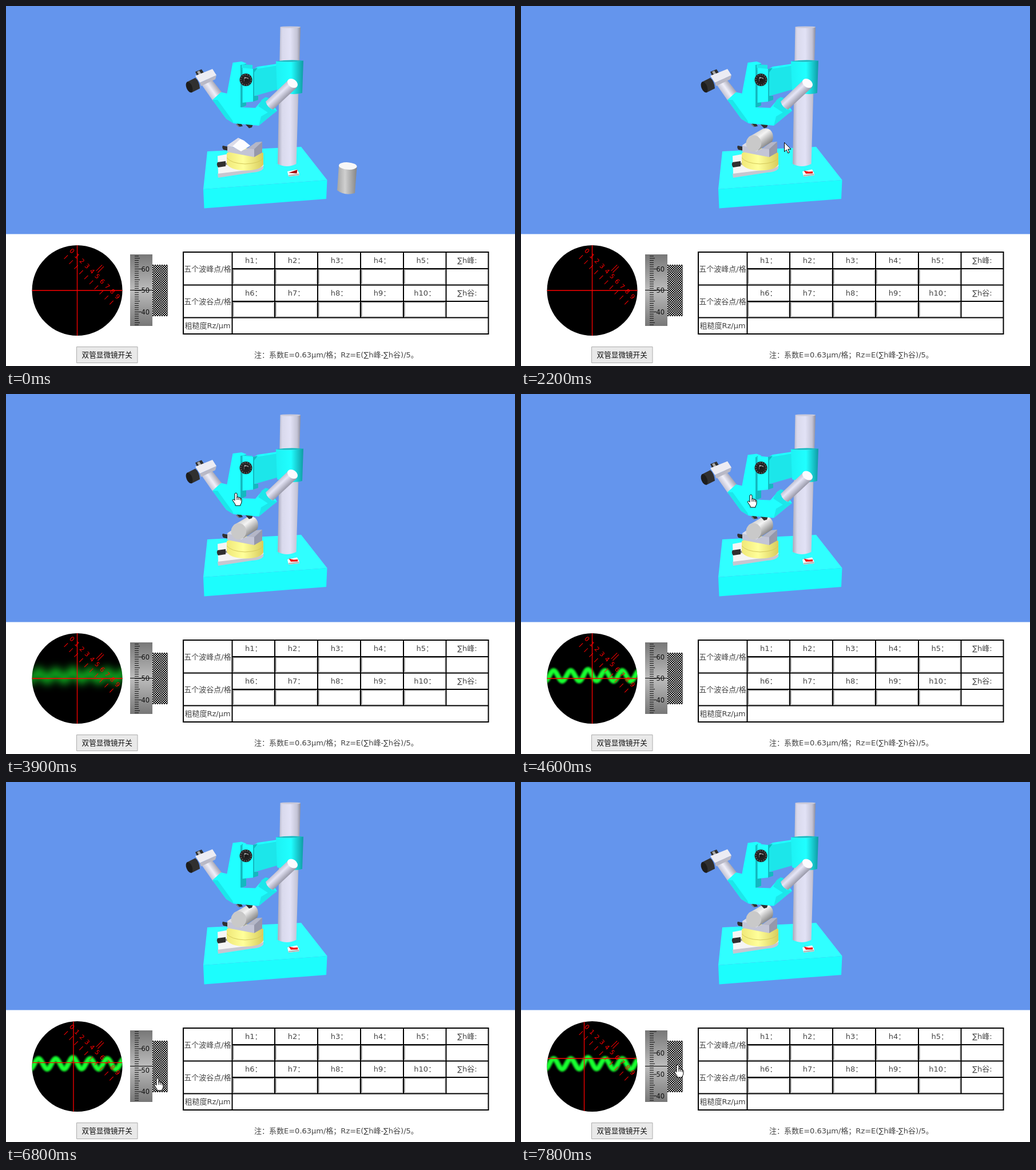
An HTML page that plays this animation: 890 by 629 pixels, repeating every 8000 ms.

```html
<!DOCTYPE html>
<html lang="zh-CN">
<head>
<meta charset="utf-8">
<title>双管显微镜</title>
<style>
html, body { margin: 0; width: 100%; height: 100%; overflow: hidden; background: #fff; }
svg { display: block; width: 890px; height: 629px; font: 13px "DejaVu Sans", "Noto Sans CJK SC", "Noto Sans CJK", sans-serif; }
.mid { text-anchor: middle; }
.cy { fill: #20ffff; }
.cy2 { fill: #1ce6ea; }
.cy3 { fill: #13b9c0; }
.dark { fill: #303030; }
.red { stroke: #f00; fill: none; }
</style>
</head>
<body>
<svg viewBox="0 0 890 629">
  <defs>
    <linearGradient id="steel">
      <stop offset="0" stop-color="#a9a9bb"/><stop offset=".2" stop-color="#d9d9ec"/>
      <stop offset=".55" stop-color="#e2e2f6"/><stop offset=".85" stop-color="#c4c4d6"/><stop offset="1" stop-color="#8d8d9c"/>
    </linearGradient>
    <linearGradient id="tubeL" gradientUnits="userSpaceOnUse" x1="351" y1="150" x2="368" y2="138">
      <stop offset="0" stop-color="#c3c3d3"/><stop offset=".45" stop-color="#f0f0fa"/><stop offset="1" stop-color="#a3a3b3"/>
    </linearGradient>
    <linearGradient id="tubeR" gradientUnits="userSpaceOnUse" x1="473" y1="147" x2="487" y2="162">
      <stop offset="0" stop-color="#b9b9ca"/><stop offset=".4" stop-color="#e6e6f7"/><stop offset="1" stop-color="#9b9bab"/>
    </linearGradient>
    <linearGradient id="collar">
      <stop offset="0" stop-color="#1df2f4"/><stop offset=".55" stop-color="#20ffff"/><stop offset="1" stop-color="#109ba4"/>
    </linearGradient>
    <linearGradient id="part">
      <stop offset="0" stop-color="#a4a4a4"/><stop offset=".4" stop-color="#d0d0d0"/><stop offset="1" stop-color="#858585"/>
    </linearGradient>
    <linearGradient id="lying" gradientUnits="userSpaceOnUse" x1="411" y1="220" x2="430" y2="244">
      <stop offset="0" stop-color="#d2d2d2"/><stop offset=".35" stop-color="#f4f4f4"/><stop offset="1" stop-color="#858585"/>
    </linearGradient>
    <linearGradient id="disc">
      <stop offset="0" stop-color="#f0e878"/><stop offset=".45" stop-color="#ffff9a"/><stop offset="1" stop-color="#d8cc5c"/>
    </linearGradient>
    <linearGradient id="drum" x2="0" y2="1">
      <stop offset="0" stop-color="#777"/><stop offset=".5" stop-color="#bdbdbd"/><stop offset="1" stop-color="#777"/>
    </linearGradient>
    <pattern id="knurl" width="4" height="4" patternUnits="userSpaceOnUse">
      <path fill="#c9c9c9" d="M0 0H4V4H0Z"/><path d="M0 0H2V2H0ZM2 2H4V4H2Z"/>
    </pattern>
    <clipPath id="eye"><circle cx="124.5" cy="497" r="79"/></clipPath>
    <clipPath id="window"><path d="M217 434H256V559H217Z"/></clipPath>
  </defs>

  <path fill="#6495ed" d="M0 0H890V398.5H0Z"/>

  <!-- base and switch -->
  <path fill="#30ffff" d="M352 254L516 246L561.5 304L345 320Z"/>
  <path fill="#1cfdfd" d="M345 320L561.5 304L560 337L346.500 353.500Z"/>
  <path fill="#fff" d="M492 289L509 285.500L512.500 292V296L494 298Z"/>
  <path fill="#bdbdbd" d="M494 295L512.500 292.500V296L494 298Z"/>
  <path id="off" fill="#a81010" d="M494 291.500L509.500 286L508.500 292.500Z"/>
  <path id="on" fill="#f01818" d="M494.500 287.500L503 289.500L510.500 289L510 292.500L498 293Z"/>

  <!-- column, collar, arm -->
  <path fill="url(#steel)" d="M479.500 37H515L507.500 276Q491 284 475 276Z"/>
  <ellipse cx="497.200" cy="37" rx="17.800" ry="1.600" fill="#c9c9da"/>
  <path class="cy2" d="M432 111L474 103V146L432 158Z"/>
  <path class="cy" d="M432 111L440 106L474 101V104Z"/>
  <path fill="url(#collar)" d="M472 96.500Q496 99 520 95.500L518 152Q500 157 474 149Z"/>
  <path class="cy3" d="M472 96.500Q496 93 520 95.500Q496 99 472 96.500Z"/>

  <!-- loose part -->
  <g id="loose">
    <path fill="url(#part)" d="M582 279L579 322Q592 332 610 327L613.500 281Z"/>
    <ellipse cx="597.800" cy="279.500" rx="15.800" ry="6.300" fill="#f7f7f7" transform="rotate(4 598 279)"/>
  </g>

  <!-- stage and block -->
  <path fill="#f5f5f5" d="M370 262L386 259L450 276Q452 284 440 286L371 294Z"/>
  <path fill="#c6c6d0" d="M370 293L428 286Q446 284 450 279V284Q446 290 430 291L371 300Z"/>
  <path class="dark" d="M379 244L389 246V253L380 251Q377 247 379 244Z"/>
  <path class="dark" d="M370 273L384 271V280L371 282Q367 277 370 273Z"/>
  <path fill="#8d8d8d" d="M384 274L389 273V277L384 278Z"/>
  <path fill="url(#disc)" d="M386 257Q418 240 450 257V277Q445 287 418 287.500Q391 286 386 276Z"/>
  <path fill="none" stroke="#d5c95c" d="M386 265Q393 275 418 276Q445 275 450 265"/>
  <path fill="#c3c5d6" d="M387 243L396 246L411 253L425 248L434 249.500V264L387 255Z"/>
  <path fill="#9698aa" d="M434 249.500L448 237V256L434 264Z"/>
  <path fill="#fdfdff" d="M387 243.500L406 230.500L416 235L427 244L411 254L397 246Z"/>
  <path fill="#dcdce8" d="M387 243.500L406 230.500L410 232.300L395 246Z"/>
  <path fill="#b4b6c6" d="M422 249L437 238L448 237L434 250Z"/>
  <g id="placed">
    <path fill="url(#lying)" d="M398 229L423 214.500Q436 212 440 223Q442 232 439 237L415 252Z"/>
    <ellipse cx="406.800" cy="240" rx="13.300" ry="14.300" fill="#c9c9c9"/>
  </g>

  <!-- sliding head, with the fixed bracket in front of it -->
  <g id="head">
    <path class="dark" d="M402 203L411 205L414 210L408 211Z"/>
    <path class="dark" d="M417 205L432 206L430 212L425 213.500Z"/>
    <path fill="#777" d="M404 206L409 211L407 211.500L402 207Z"/>
    <path class="dark" d="M331 115L342 110.500L348 120L336 126Z"/>
    <path fill="#aaa" d="M334 115L338 113L343 121L339 123Z"/>
    <path fill="url(#tubeL)" d="M341 136L357 125L380 154L362 166Z"/>
    <path fill="#ececf3" d="M331 122L361 110L368 121L339 134Z"/>
    <path fill="#b9b9c6" d="M339 134L368 121L366 128L341 140Z"/>
    <path class="dark" d="M316 133L331 125.500Q338 131 339 144L324 151.500Q314 146 316 133Z"/>
    <ellipse cx="320.500" cy="142" rx="5" ry="9.800" fill="#1d1d1d" transform="rotate(-22 320 142)"/>
    <path class="cy" d="M396.500 99L412 97L420 100V174L409 178L386 155Z"/>
    <path class="cy3" d="M410 103L420 101V174L410 178Z"/>
    <path class="cy2" d="M412 102L431 103V112H412Z"/>
    <path class="cy" d="M361 164L376 150.500L387 153L410 177L436 178L450 162L462 165L474 183L465 190L442 209L398 205L385 197Z"/>
    <path class="cy2" d="M361 164L385 197L398 205L396 200L370 164Z"/>
    <path class="cy2" d="M442 209L465 190L474 183L466 181L446 193Z"/>
    <path class="cy2" d="M441 175L447 164L454 159L460 161L455 166L464 181L472 185L464 190Z"/>
    <path fill="url(#tubeR)" d="M454 167L493 130L509 142L467 181Q457 178 454 167Z"/>
    <ellipse cx="501" cy="135" rx="9.800" ry="7" fill="#fbfbff" transform="rotate(36 501 135)"/>
  </g>
  <path class="cy" d="M413 108L432 110V167L413 169Z"/>
  <path class="cy3" d="M432 110L440 108L434 116V157L441 157V164L432 167Z"/>
  <path fill="none" stroke="#12aeb5" d="M413 108V169"/>
  <circle cx="419.500" cy="129" r="11" fill="#232323"/>
  <circle cx="419.500" cy="129" r="9" fill="none" stroke="#666" stroke-width="2" stroke-dasharray="1.500 2.500"/>
  <path fill="#b5b5b5" d="M417 124L424 126L421 133L416 131Z"/>
  <circle cx="420" cy="129.500" r="3.500" fill="#1c1c1c"/>

  <!-- eyepiece view -->
  <circle cx="124.500" cy="497" r="79"/>
  <g clip-path="url(#eye)">
    <g id="wave" fill="none" stroke-linejoin="round">
      <path stroke="#0a8f18" stroke-width="10.500"/>
      <path stroke="#18ff30" stroke-width="6.500"/>
    </g>
    <g id="scale" transform="translate(115.500 428) rotate(45)" fill="#f00" font-size="11" class="mid">
      <path class="red" d="M54.500 -20V-5M58.500 -20V-5"/>
    </g>
    <path id="cross" class="red" stroke-width="1.300" d="M124.500 400V600M30 497H220"/>
  </g>

  <!-- micrometer -->
  <path fill="url(#drum)" d="M217 434H256V559H217Z"/>
  <g clip-path="url(#window)"><g id="ticks" font-size="11.500" fill="#111"></g></g>
  <path stroke="#000" d="M217 496.500H256"/>
  <path fill="url(#knurl)" d="M256 452H283V542H256Z"/>

  <g id="table" fill="#444"></g>
  <path fill="#e9e9e9" stroke="#adadad" d="M123.500 595.500H230V623.500H123.500Z"/>
  <text class="mid" x="176.700" y="614" font-size="12.600" fill="#111">双管显微镜开关</text>
  <text x="434" y="614" fill="#444">注：系数E=0.63μm/格；Rz=E(∑h峰-∑h谷)/5。</text>

  <g id="cursor" fill="#fff" stroke="#000" stroke-linejoin="round">
    <path id="arrow" d="M.5 .5V16.500L4.200 13.200L6.800 19L9.300 18L6.800 12.200H12Z"/>
    <g id="hand">
      <path d="M-2 2Q-2 0 0 0T2 2V8Q2 6.500 3.500 6.700T5 8.300Q5.500 7.500 7 8T8 9.500Q10 9 10 11V15Q10 18 8 20V22H-1V20L-5 14Q-6.500 12 -5 11.200T-2 13Z"/>
      <path fill="none" d="M2 7V12M5 8V12M8 9V13"/>
    </g>
  </g>
</svg>
<script>
const $ = id => document.getElementById(id);

function add(parent, tag, attrs, text) {
  const el = document.createElementNS("http://www.w3.org/2000/svg", tag);
  for (const k in attrs) el.setAttribute(k, attrs[k]);
  if (text !== undefined) el.textContent = text;
  $(parent).append(el);
}

// Profile seen in the eyepiece
let d = "";
for (let x = 36; x <= 214; x++) {
  const y = 492.500 - 9 * Math.cos((x - 57) * Math.PI / 15) - 2 * Math.exp(-(((x - 118) / 12) ** 2));
  d += (d ? "L" : "M") + x + " " + y.toFixed(1);
}
for (const p of $("wave").children) p.setAttribute("d", d);

for (let i = 0; i < 10; i++) {
  const u = i * 12.500;
  add("scale", "text", { x: u, y: 4 }, i);
  add("scale", "path", { class: "red", d: `M${u} 10.500V19.500` });
}

const unitY = n => 497 - (n - 50) * 3.750;
for (let n = 26; n <= 72; n++) {
  const long = n % 10 ? (n % 5 ? 7 : 9) : 12;
  add("ticks", "path", { stroke: "#111", d: `M225 ${unitY(n)}h${long}` });
}
for (const n of [40, 50, 60]) {
  add("ticks", "text", { x: 236.500, y: unitY(n) + 4.200, textLength: "" }, n);
}

// Results table
const cols = [395.500, 470, 545, 620, 695, 769.500, 843.500];
const label = (x, y, s) => add("table", "text", { class: "mid", x, y }, s);
const names = [["h1：", "h2：", "h3：", "h4：", "h5：", "∑h峰:"], ["h6：", "h7：", "h8：", "h9：", "h10：", "∑h谷:"]];
names.forEach((row, r) => {
  const top = 430 + r * 57.300;
  label(352.500, top + 33.500, r ? "五个波谷点/格" : "五个波峰点/格");
  row.forEach((s, c) => {
    label((cols[c] + cols[c + 1]) / 2, top + 19, s);
    if (c > 4) return;
    const x = cols[c] + 2, y = top + 30.500, w = cols[c + 1] - cols[c] - 4, h = 25;
    add("table", "path", { fill: "none", stroke: "#999", "stroke-width": 1.500, d: `M${x} ${y + h}v${-h}h${w}` });
    add("table", "path", { fill: "none", stroke: "#d6d6d6", "stroke-width": 1.500, d: `M${x} ${y + h}h${w}v${-h}` });
  });
});
label(352.500, 563, "粗糙度Rz/μm");
let grid = "M310 430H843.500V573H310ZM395.500 430V573M310 487.500H843.500M310 544.500H843.500M395.500 459H843.500M395.500 516H843.500";
for (const x of cols.slice(1, 6)) grid += `M${x} 430V544.500`;
add("table", "path", { fill: "none", stroke: "#000", "stroke-width": 2, d: grid });

// time, x, y of the pointer tip
const path = [
  [100, 873, 44], [500, 600, 285], [600, 583, 297], [900, 583, 297], [1000, 562, 298], [1200, 502, 292],
  [1300, 504, 287], [1600, 504, 290], [1900, 504, 290], [2600, 402, 168], [5000, 402, 168],
  [5900, 450, 458], [6000, 430, 468], [6200, 288, 517], [6400, 266, 520], [7100, 265, 514], [7800, 274, 494]
];
const hands = [[600, 900], [1300, 1900], [2600, 5000], [6300, 8000]];
// time, head drop, blur of the profile
const focus = [
  [0, 0, 0], [3100, 1.500, 0], [3500, 2.500, 9], [3600, 3.500, 7.500], [3800, 4.200, 7.500], [3900, 5, 7.500],
  [4100, 5, 5], [4400, 6, 3.500], [4500, 7, 2], [4600, 7.500, .8]
];
const turn = [[6300, 0], [7100, 10.500], [7800, 14]];

function at(keys, t) {
  if (t <= keys[0][0]) return keys[0].slice(1);
  const i = keys.findIndex(k => k[0] >= t);
  if (i < 0) return keys[keys.length - 1].slice(1);
  const a = keys[i - 1], b = keys[i], f = (t - a[0]) / (b[0] - a[0]);
  return a.slice(1).map((v, j) => v + (b[j + 1] - v) * f);
}

const move = (id, x, y) => $(id).setAttribute("transform", `translate(${x} ${y})`);
const show = (id, on) => { $(id).style.display = on ? "" : "none"; };

function draw(now) {
  const t = Math.floor((now % 8000) / 100) * 100;
  const [, drop, blur] = focus.filter(k => k[0] <= t).pop();
  const [shift] = at(turn, t);
  let [x, y] = at(path, t);
  if (t <= 5000) y += drop;
  else if (t < 5900) y += drop * (5900 - t) / 900;

  show("cursor", t >= 100);
  move("cursor", Math.round(x), Math.round(y));
  const hand = hands.some(([a, b]) => t >= a && t <= b);
  show("hand", hand);
  show("arrow", !hand);

  show("loose", t < 800);
  show("placed", t >= 800);
  show("off", t < 1800);
  show("on", t >= 1800);

  move("head", 0, drop);
  show("wave", t >= 3500);
  $("wave").style.filter = `blur(${blur}px)`;
  move("cross", -shift, -shift);
  move("ticks", 0, shift);
}

const start = performance.now();
function loop() {
  draw(performance.now() - start);
  requestAnimationFrame(loop);
}
loop();
</script>
</body>
</html>
```
